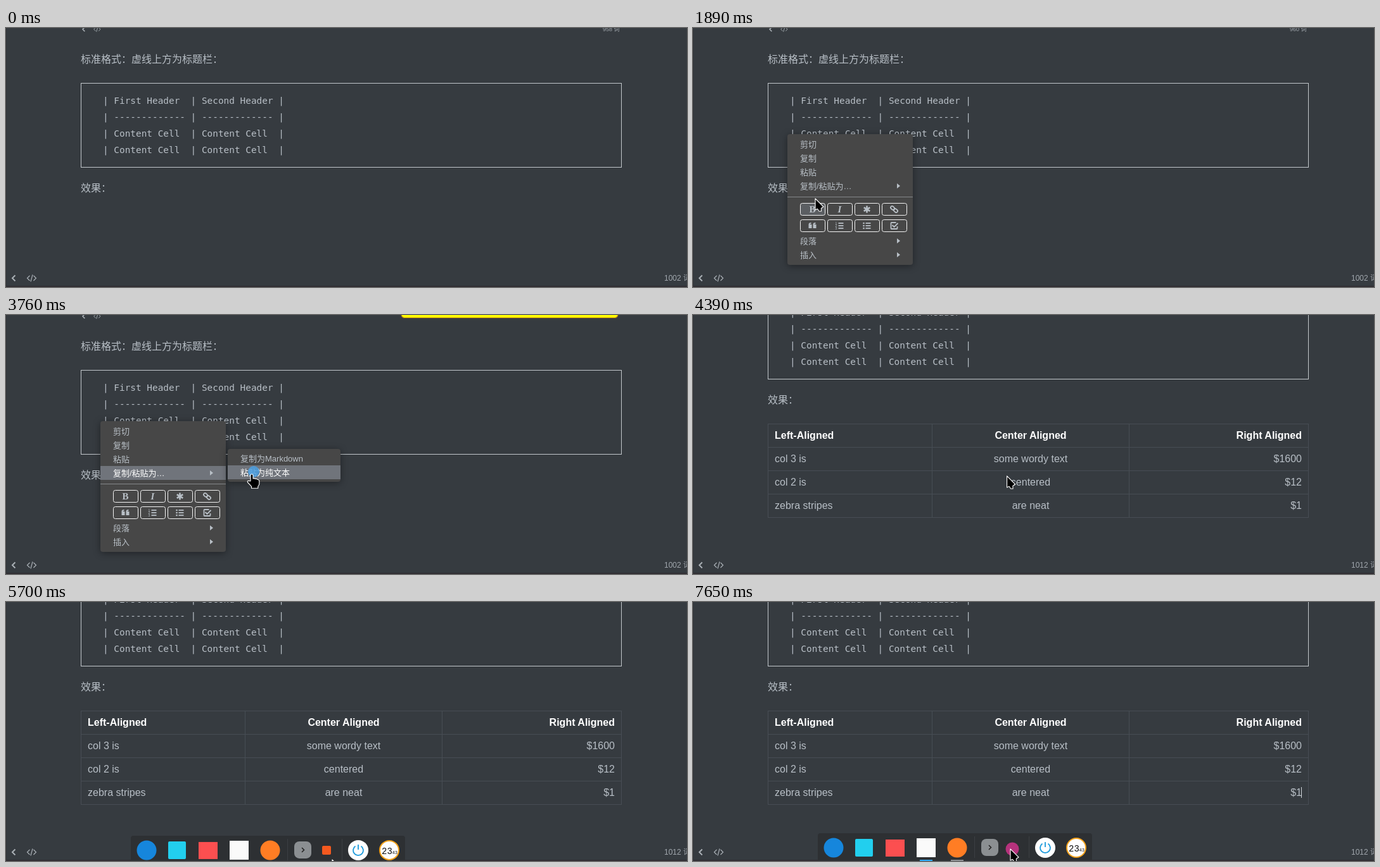
Animation, 1075 px wide and 410 px high, one loop 7750 ms. Source, as an HTML page:

```html
<!DOCTYPE html>
<html lang="zh-CN">
<head>
<meta charset="utf-8">
<style>
  html, body { margin: 0; width: 100%; height: 100%; overflow: hidden; background: #363b40; }
  svg { display: block; }
  text { white-space: pre; fill: #b8bfc6; font-family: "Liberation Sans", "Noto Sans CJK SC", sans-serif; }
  .body { font-size: 16px; }
  .code { font: 14.4px "DejaVu Sans Mono", monospace; }
  .head { font-size: 16px; font-weight: bold; fill: #fff; }
  .item { font-size: 13px; }
  .on { fill: #fff; }
  .status { font-size: 12px; fill: #a0a6ac; }
  .tiny { font-size: 9px; fill: #a0a6ac; }
  .line { fill: none; stroke: #a9afb5; stroke-width: 1.5; }
  .glyph { fill: none; stroke: #b8bfc6; stroke-width: 1.8; }
  .panel { fill: #474747; filter: drop-shadow(0 2px 6px rgba(0,0,0,.4)); }
  .pick { fill: #70747b; }
  .cursor { fill: #000; stroke: #fff; stroke-width: 1.1; stroke-linejoin: round; }
</style>
</head>
<body>
<svg id="stage" width="1075" height="410" viewBox="0 0 1075 410"></svg>
<script>
const LOOP = 7750;
const text = (cls, x, y, s, extra = '') => `<text class="${cls}" x="${x}" y="${y}" ${extra}>${s}</text>`;
const rect = (x, y, w, h, extra) => `<rect x="${x}" y="${y}" width="${w}" height="${h}" ${extra}/>`;
const circle = (x, y, r, extra) => `<circle cx="${x}" cy="${y}" r="${r}" ${extra}/>`;
const path = (d, extra) => `<path d="${d}" ${extra}/>`;
const group = (id, inner) => `<g id="${id}">${inner}</g>`;
const moved = (x, y, inner) => `<g transform="translate(${x} ${y})">${inner}</g>`;

const barIcons = path('M14.5 391.5l-4.5 4.5 4.5 4.5', 'class="line" style="stroke-width:2"') +
  path('M37.5 392l-4 4 4 4M43.5 392l4 4-4 4M42 390.5l-3 11', 'class="line" style="stroke-width:1.2"');

function codeBlock() {
  const cell = '| Content Cell  | Content Cell  |';
  const rows = ['| First Header  | Second Header |', '| ------------- | ------------- |', cell, cell];
  return rect(118.5, 87.5, 853, 133, 'fill="none" stroke="#c3c8cc"') +
    rows.map((s, i) => text('code', 153, 120 + 26 * i, s)).join('');
}

function table() {
  const rows = [['Left-Aligned', 'Center Aligned', 'Right Aligned'], ['col 3 is', 'some wordy text', '$1600'],
    ['col 2 is', 'centered', '$12'], ['zebra stripes', 'are neat', '$1']];
  const anchors = [[129, 'start'], [533, 'middle'], [961, 'end']];
  const grid = [0, 1, 2, 3, 4].map(i => `M118 ${291.5 + 37 * i}h854`).join('') +
    [118.5, 377.5, 688.5, 971.5].map(x => `M${x} 291v149`).join('');
  return path(grid, 'stroke="#474d54" fill="none"') + rows.map((row, r) => row.map((s, c) =>
    text(r ? 'body' : 'head', anchors[c][0], 315 + 37 * r, s, `text-anchor="${anchors[c][1]}"`)).join('')).join('');
}

const embedded = moved(113.5, -295, `<g transform="scale(.75)">${barIcons}</g>`) +
  text('tiny', 942, 5, '', 'id="tinyCount"') +
  rect(620, -20, 346, 24.5, 'id="banner" rx="5" fill="#ff0" stroke="#b87a10" stroke-width="1.2"');

const arrow = y => path(`M322 ${y - 4}v8l5-4z`, 'fill="#b8bfc6"');

function listGlyph(numbered) {
  const rows = [-4, 0, 4];
  return rows.map(y => path(`M-2 ${y}h8`, 'class="glyph"') + (numbered
    ? text('', -7, y + 2, y / 4 + 2, 'font-size="5"') : circle(-5, y, 1.3, 'fill="#b8bfc6"'))).join('');
}

function toolButtons() {
  const serif = 'text-anchor="middle" style="font:bold 15px \'Liberation Serif\',serif"';
  const glyphs = [
    text('', 0, 5, 'B', serif),
    text('', 0, 5, 'I', serif.replace('bold', 'italic bold')),
    path('M0-5.5V5.5M-4.8-2.8L4.8 2.8M-4.8 2.8L4.8-2.8', 'class="glyph" style="stroke-width:2.6"'),
    `<g transform="rotate(40)" class="glyph">${rect(-6.5, -2.3, 6.5, 4.6, 'rx="2.2"')}${rect(0, -2.3, 6.5, 4.6, 'rx="2.2"')}</g>`,
    path('M-1 0h-5v-2q0-3 4-3v2q-2 0-2 1h3v6h-5v-4M6 0h-5v-2q0-3 4-3v2q-2 0-2 1h3v6h-5v-4', 'fill="#b8bfc6"'),
    listGlyph(true),
    listGlyph(false),
    path('M5 1v3q0 1-1 1h-8q-1 0-1-1v-8q0-1 1-1h7M-3-1l3 3 6-6', 'class="glyph"')
  ];
  return glyphs.map((g, i) => {
    const x = 169 + 43 * (i % 4), y = i < 4 ? 277 : 303;
    return rect(x + .5, y + .5, 39, 19, `rx="3" stroke="#f2f2f2" fill="none" ${i ? '' : 'id="bold"'}`) + moved(x + 19.5, y + 10, g);
  }).join('');
}

const menu = rect(149, 168, 198, 207, 'rx="4" class="panel"') +
  rect(149, 239, 198, 22, 'class="pick" id="pickMain"') +
  ['剪切', '复制', '粘贴'].map((s, i) => text('item', 169, 188.5 + 22 * i, s)).join('') +
  text('item', 169, 254.5, '复制/粘贴为…', 'id="pasteAs"') +
  path('M149 267.5h198', 'stroke="#85888b"') + toolButtons() +
  text('item', 169, 341.5, '段落') + text('item', 169, 363.5, '插入') +
  [250, 337, 359].map(arrow).join('');

const submenu = rect(350, 212, 178, 52, 'rx="4" class="panel"') +
  rect(350, 238, 178, 22, 'class="pick" id="pickSub"') +
  text('item', 370, 231.5, '复制为Markdown') + text('item', 370, 253.5, '粘贴为纯文本', 'id="plain"');

const dock = rect(197, 366, 433, 60, 'rx="4" fill="#2d3033"') +
  circle(222, 389, 15.5, 'fill="#1686dc"') +
  rect(256, 375, 28, 28, 'rx="2" fill="#22cfee"') +
  rect(304, 376, 30, 27, 'fill="#fc4f50"') +
  rect(353, 374, 30, 30, 'fill="#fafafa"') +
  circle(417, 389, 15.5, 'fill="#ff7d24"') +
  rect(358, 408, 20, 3, 'fill="#2ca7f8"') + rect(407, 408, 20, 3, 'fill="#8b8e91"') +
  path('M444.5 371v34M530.5 371v34', 'stroke="#3c3f43"') +
  rect(455, 375, 27, 27, 'rx="8" fill="#8b8f92"') +
  path('M467 385l3.5 3.5-3.5 3.5', 'fill="none" stroke="#222" stroke-width="1.5"') +
  rect(499, 382, 14, 14, 'rx="2" fill="#f4591f" id="trayA"') +
  circle(504, 391, 10.5, 'fill="#b5327c" id="trayB"') +
  circle(556, 389, 16, 'fill="#fff"') +
  path('M551.5 382.5a8 8 0 1 0 9 0M556 380v8', 'fill="none" stroke="#1d9bdc" stroke-width="1.8"') +
  circle(605, 389, 15, 'fill="#fff" stroke="#f5a21b" stroke-width="2"') +
  text('', 593, 395, '23', 'style="font:14px \'Liberation Mono\',monospace;fill:#111"') +
  text('', 609.5, 395, '43', 'style="font:7px \'Liberation Mono\',monospace;fill:#111"');

const pointer = path('M0 0V18L3.5 16.3L6 20H9.5L9.3 15.5L13 13Z', 'class="cursor" id="arrow"') +
  path('M-2 10V1q0-2 2-2t2 2v5q2-1 3.5.5q2-.8 3.2.8q3 0 3.1 3v4q0 2-2 4v3H-.5v-3L-6.5 12q-1-2.5 1.5-2.6z', 'class="cursor" id="hand"');

const stage = document.getElementById('stage');
stage.innerHTML = rect(0, 0, 1075, 410, 'fill="#363b40"') +
  group('doc', embedded + text('body', 118, 55, '标准格式：虚线上方为标题栏：') + codeBlock() +
    text('body', 118, 259, '效果：') + group('table', table()) +
    rect(118, 296, 1, 17, 'id="caretA" fill="#b8bfc6"') + rect(960, 412, 1, 17, 'id="caretB" fill="#d0d5da"')) +
  rect(0, 383, 1075, 27, 'fill="#363b40"') + barIcons + text('status', 1039, 400, '', 'id="count"') +
  rect(0, 0, 1, 410, 'fill="#2f3236"') + rect(0, 408, 1075, 2, 'fill="#302e33"') +
  group('menu', menu) + group('submenu', submenu) +
  circle(391, 248, 9, 'id="click" fill="#4a9fe0" fill-opacity=".85"') +
  group('dock', dock) + group('pointer', pointer);

const el = id => document.getElementById(id);
const show = (id, visible) => el(id).style.display = visible ? '' : 'none';
const clamp = v => Math.max(0, Math.min(1, v));
const easeOut = p => 1 - (1 - p) ** 3;
const smooth = p => p * p * (3 - 2 * p);

// time, x, y
const route = [[1280, 420, -25], [1660, 149, 300], [1780, 160, 296], [1890, 193, 270], [1980, 193, 270], [2200, 264, 251],
  [2880, 264, 251], [3230, 388, 253], [4060, 388, 253], [4430, 499, 255], [4520, 499, 255], [4860, 504, 281],
  [5030, 504, 281], [5400, 515, 408], [5920, 515, 408], [6200, 530, 402], [6640, 530, 402], [7140, 501, 391]];

function pointerAt(t) {
  const next = route.findIndex(p => p[0] > t);
  if (next < 0) return route.at(-1).slice(1);
  if (!next) return route[0].slice(1);
  const [a, b] = [route[next - 1], route[next]];
  const p = smooth((t - a[0]) / (b[0] - a[0]));
  return [a[1] + (b[1] - a[1]) * p, a[2] + (b[2] - a[2]) * p];
}

function blink(t, start, half) {
  return Math.floor((t - start) / half) % 2 === 0;
}

function render(t) {
  const pasted = t >= 4040;
  const [x, y] = pointerAt(t);
  const hover = t >= 2120 && !pasted, hoverSub = hover && x > 352;

  el('doc').setAttribute('transform', `translate(0 ${pasted ? -119 : 0})`);
  show('table', pasted);
  el('count').textContent = pasted ? '1012 词' : '1002 词';
  el('tinyCount').textContent = t < 1500 ? '958 词' : '960 词';
  show('tinyCount', t < 2490);
  show('banner', t >= 2490);
  el('banner').setAttribute('x', t < 3100 ? 620 : 624);
  el('banner').setAttribute('width', t < 3100 ? 346 : 342);
  show('caretA', !pasted && t >= 50 && blink(t, 960, 557));
  show('caretB', t >= 4620 && blink(t, 4620, 730));

  show('menu', t >= 1720 && !pasted);
  show('pickMain', hover);
  el('pasteAs').classList.toggle('on', hover);
  el('bold').setAttribute('fill', t > 1850 && t < 2080 ? '#5b5e62' : 'none');
  show('submenu', t >= 2490 && !pasted);
  show('pickSub', hoverSub);
  el('plain').classList.toggle('on', hoverSub);
  show('click', t >= 3680 && t < 3900);

  const rise = 41 * easeOut(clamp((t - 5500) / 280)) + 3 * smooth(clamp((t - 6250) / 150));
  el('dock').setAttribute('transform', `translate(0 ${44 - rise})`);
  show('dock', t >= 5500);
  show('trayA', t < 7500);
  show('trayB', t >= 7500);

  show('arrow', !hover);
  show('hand', hover);
  el('pointer').setAttribute('transform', `translate(${x} ${y})`);
}

function tick() {
  render(performance.now() % LOOP);
  requestAnimationFrame(tick);
}
tick();
</script>
</body>
</html>
```
